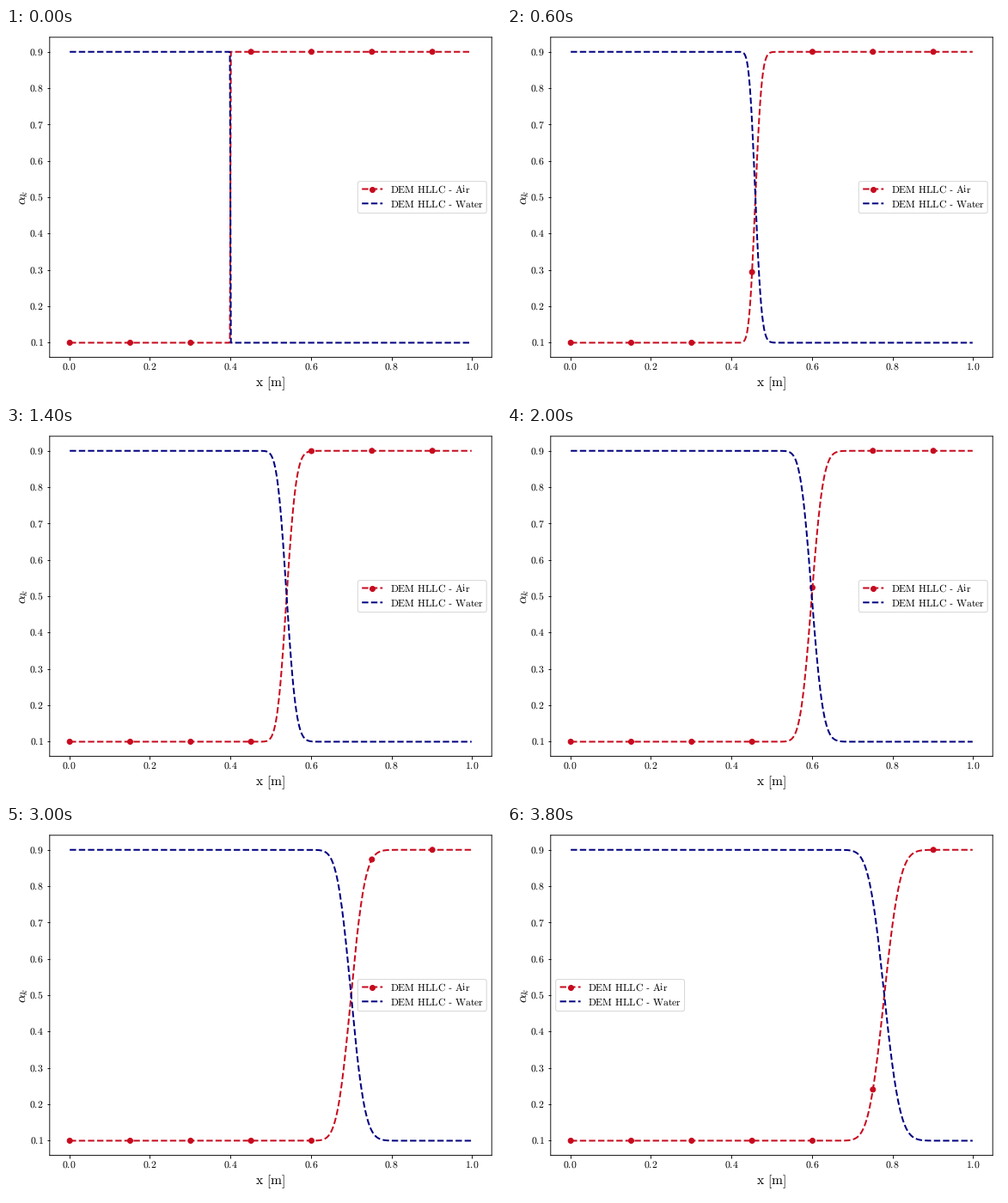
Animation of 576x432 px, one loop 4000 ms. Source, as a matplotlib script:

```python
import math

import matplotlib.pyplot as plt
import numpy as np
from matplotlib.animation import FuncAnimation
from matplotlib.patches import FancyBboxPatch

W, H, DPI = 576, 432, 72
FRAMES, INTERVAL = 20, 200
RED, NAVY = "#c70a1e", "#000080"
CELLS, JUMP_CELL = 400, 160
CELLS_PER_FRAME = 8
MARK_EVERY = 60
LEGEND_MOVES_AT = 16
LEGEND_SHIFT = 352.6

plt.rcParams.update({
    "font.family": "Liberation Serif",
    "mathtext.fontset": "cm",
    "font.size": 11.75,
    "text.hinting": "none",
    "path.snap": False,
    "axes.linewidth": 0.9,
    "xtick.major.width": 0.9,
    "ytick.major.width": 0.9,
    "xtick.major.pad": 2.5,
})

x = (np.arange(CELLS) + 0.5) / CELLS
steps = np.arange(CELLS - JUMP_CELL)
log_factorial = np.array([math.lgamma(k + 1) for k in steps])


def air_fraction(frame):
    """First-order upwind advection of a step: a Poisson-shaped front."""
    mean = CELLS_PER_FRAME * frame
    front = np.ones(len(steps))
    if mean:
        front = np.cumsum(np.exp(steps * math.log(mean) - mean - log_factorial))
    return 0.1 + 0.8 * np.concatenate([np.zeros(JUMP_CELL), front])


def roman(text):
    return r"$\mathrm{" + text.replace(" ", r"\hspace{0.37}") + "}$"


def dots(axes, xs, ys):
    # One size per dot keeps their centres off the pixel grid
    return axes.scatter(xs, ys, s=np.full(len(xs), 36.0), color=RED, lw=1, zorder=2)


fig = plt.figure(figsize=(W / DPI, H / DPI), dpi=DPI, facecolor="white")

# Plot area, placed in pixels from the top left
left, top, right, bottom = 50.8, 10.8, 565.2, 383.4
ax = fig.add_axes([left / W, 1 - bottom / H, (right - left) / W, (bottom - top) / H])
xticks = np.arange(6) / 5
yticks = np.arange(1, 10) / 10
ax.set_xticks(xticks, [f"${v:.1f}$" for v in xticks])
ax.set_yticks(yticks, [f"${v:.1f}$" for v in yticks])
ax.set_xlabel(roman("x [m]"), fontsize=15.6, labelpad=3)
ax.set_ylabel(r"$\alpha_k$", fontsize=15.6, labelpad=-1)

air, = ax.plot(x, air_fraction(0), "--", color=RED, lw=2)
marks = dots(ax, x[::MARK_EVERY], air_fraction(0)[::MARK_EVERY])
water, = ax.plot(x, 1 - air_fraction(0), "--", color=NAVY, lw=2, zorder=3)
margin = 0.05 * (x[-1] - x[0])
ax.set_xlim(x[0] - margin, x[-1] + margin)
ax.set_ylim(0.06, 0.94)

# Legend on a pixel-sized overlay, so that it can jump sideways
key = fig.add_axes([0, 0, 1, 1], zorder=5)
key.axis("off")
key.add_patch(FancyBboxPatch((409.3, 178.6), 149.9, 37,
                             boxstyle="round,pad=0,rounding_size=2.4",
                             fc="white", ec="0.8", lw=1, alpha=0.8))
for label, color, y, baseline in (("Air", RED, 187.5, 192),
                                  ("Water", NAVY, 204.3, 209)):
    key.plot([414.2, 438.2], [y, y], "--", color=color, lw=2)
    key.text(447, baseline, roman("DEM HLLC \u2010 " + label), va="baseline")
dots(key, [426.2], [187.5])
key.set_ylim(H, 0)


def draw(frame):
    alpha = air_fraction(frame)
    air.set_ydata(alpha)
    water.set_ydata(1 - alpha)
    marks.set_offsets(np.column_stack([x, alpha])[::MARK_EVERY])
    shift = LEGEND_SHIFT if frame >= LEGEND_MOVES_AT else 0
    key.set_xlim(shift, shift + W)
    return air, marks, water


anim = FuncAnimation(fig, draw, frames=FRAMES, interval=INTERVAL,
                     repeat=True, repeat_delay=0)
plt.show()
```
